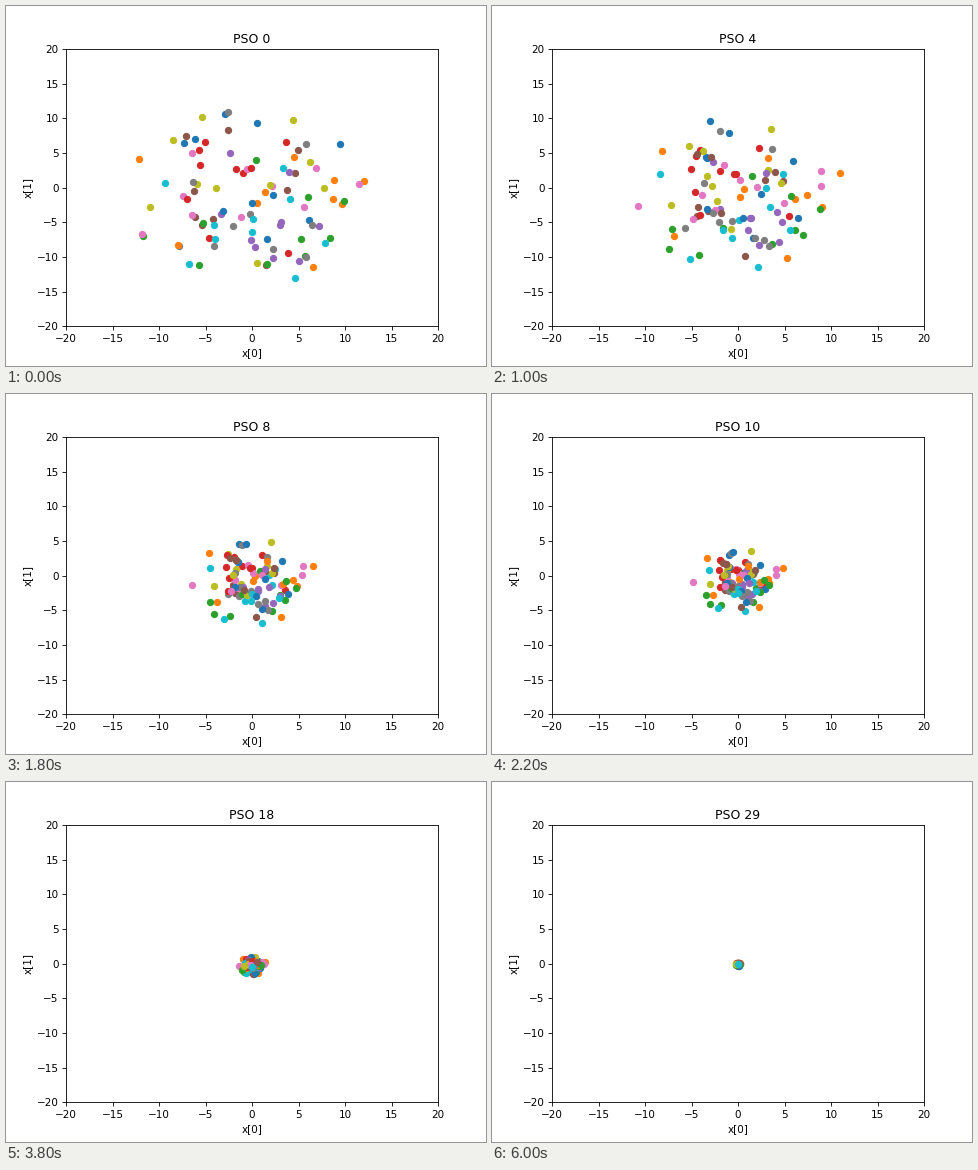
A matplotlib script for the animation above (6.2 s loop, 480 px wide and 360 px high).

```python
import matplotlib.pyplot as plt
import numpy as np
from matplotlib.animation import FuncAnimation

FRAMES, INTERVAL = 31, 200
COUNT = 100
FAST = 0.45  # decay rate of the initial velocity

# A few strays that shape the outline: start and place two iterations later.
# The index picks the colour from the default cycle.
STRAYS = {
    1: ((12, 1), (12.8, 2.2)),
    2: ((-11.7, -7), (-9.6, -9.6)),
    6: ((-11.8, -6.6), (-12.6, -4.1)),
    9: ((4.6, -13), (3.1, -13.5)),
    11: ((-12.2, 4.1), (-10.4, 5.8)),
    12: ((-5.7, -11.2), (-5.2, -11.5)),
    19: ((-6.8, -11), (-6.3, -12)),
    21: ((6.6, -11.5), (6.4, -11.9)),
}

rng = np.random.default_rng(4)

# The swarm starts in a disc that is denser towards the middle.
radius = 11.8 * rng.random(COUNT) ** 0.65
angle = rng.uniform(0, 2 * np.pi, COUNT)
start = np.column_stack([radius * np.cos(angle), radius * np.sin(angle)])
later = 0.93 * start + rng.normal(0, 1.2, (COUNT, 2))
slow = rng.uniform(0.13, 0.25, (COUNT, 1))
for i, (first, second) in STRAYS.items():
    start[i], later[i], slow[i] = first, second, 0.16

# Overdamped pull to the centre, through both known positions.
fast2 = np.exp(-2 * FAST)
slow_part = (later - fast2 * start) / (np.exp(-2 * slow) - fast2)
fast_part = start - slow_part


def positions(k):
    return slow_part * np.exp(-slow * k) + fast_part * np.exp(-FAST * k)


fig, ax = plt.subplots(figsize=(6.4, 4.8), dpi=75)
dots = [ax.plot([x], [y], "o")[0] for x, y in start]
ax.set(xlim=(-20, 20), ylim=(-20, 20), xlabel="x[0]", ylabel="x[1]")
title = ax.set_title("PSO 0")


def update(frame):
    k = max(frame - 1, 0)  # the first state is held for two frames
    for dot, (x, y) in zip(dots, positions(k)):
        dot.set_data([x], [y])
    title.set_text(f"PSO {k}")
    return [*dots, title]


anim = FuncAnimation(fig, update, frames=FRAMES, interval=INTERVAL, repeat=True)
plt.show()
```
